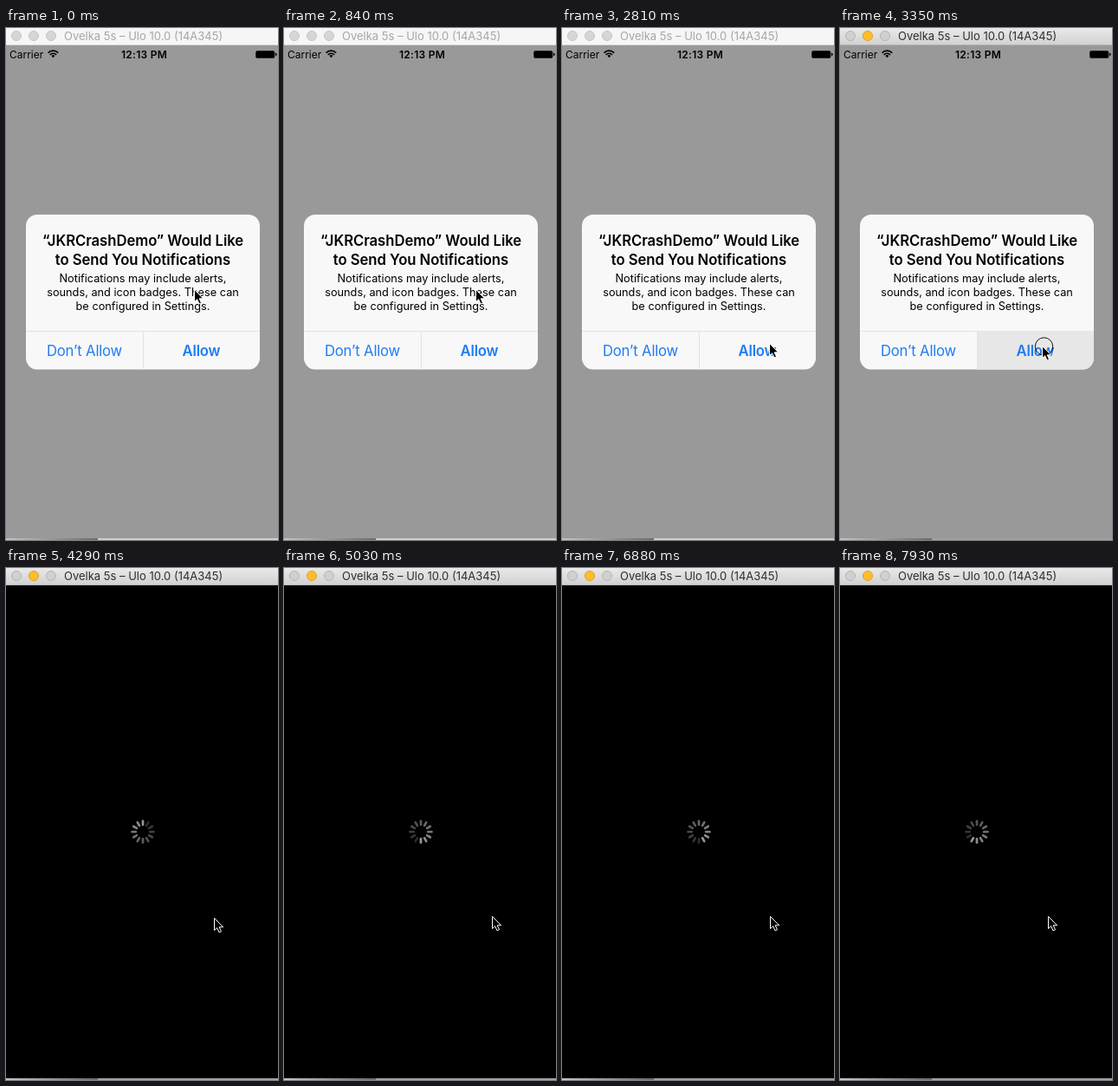
These frames come from a looping animation (314 px wide and 590 px high, 8000 ms). An HTML page:

```html
<!DOCTYPE html>
<html lang="en">
<head>
<meta charset="utf-8">
<title>Notification prompt</title>
<style>
  html, body { margin: 0; width: 100%; height: 100%; overflow: hidden; background: #000; }
  svg { display: block; width: 314px; height: 590px; }
  text { font-family: Inter, "Open Sans", sans-serif; white-space: pre; }
  .mid { text-anchor: middle; }
  .bar { font-size: 13px; }
  .status { font-size: 12px; }
  .clock { letter-spacing: .25px; }
  .head { font-size: 16.7px; font-weight: 600; letter-spacing: -.06px; }
  .body { font-size: 12.75px; }
  .btn { font-size: 16.7px; letter-spacing: -.2px; fill: #1e7cf5; }
  .bold { font-weight: 600; }
</style>
</head>
<body>
<svg viewBox="0 0 314 590">
  <defs>
    <linearGradient id="chrome" x1="0" y1="0" x2="0" y2="1">
      <stop offset="0" stop-color="#e9e9e9"/>
      <stop offset="1" stop-color="#d1d1d1"/>
    </linearGradient>
    <linearGradient id="shade">
      <stop offset="0" stop-color="#c4c4c4"/>
      <stop offset="1" stop-color="#6a6a6a"/>
    </linearGradient>
    <clipPath id="card"><rect x="23" y="215" width="270" height="178.5" rx="13.2"/></clipPath>
  </defs>

  <g id="bar">
    <rect id="barFill" width="314" height="20"/>
    <rect id="barLine" y="19" width="314" height="1"/>
    <g id="lights"></g>
    <text id="barText" class="bar" x="67" y="14">Ovelka 5s – Ulo 10.0 (14A345)</text>
  </g>

  <g id="prompt">
    <rect y="20" width="314" height="568" fill="#999"/>
    <text class="status" x="4" y="34.5">Carrier</text>
    <g fill="none" stroke="#000" stroke-width="1.7">
      <path d="M48.6 28.6a8.2 8.2 0 0 1 11.6 0M50.7 30.8a5.2 5.2 0 0 1 7.4 0"/>
      <path d="M54.4 34.2l-2-2.2a2.9 2.9 0 0 1 4 0z" fill="#000" stroke="none"/>
    </g>
    <text class="status bold clock mid" x="159.5" y="34.5">12:13 PM</text>
    <rect x="288.5" y="26.5" width="21.5" height="8" rx="1.6" stroke="#000" stroke-opacity=".5"/>
    <path d="M311 28.6q1.7 .6 1.7 1.9t-1.7 1.9z"/>

    <g clip-path="url(#card)">
      <rect x="23" y="215" width="270" height="179" fill="#f8f8f8"/>
      <path d="M23 349.5H293M158.5 349V394" stroke="#e3e3e3"/>
      <rect id="pressed" x="158.5" y="349" width="135" height="45" fill="#e7e7e7"/>
    </g>
    <text class="head mid" x="158" y="251">“JKRCrashDemo” Would Like</text>
    <text class="head mid" x="158" y="273">to Send You Notifications</text>
    <text class="body mid" x="158" y="293">Notifications may include alerts,</text>
    <text class="body mid" x="158" y="309">sounds, and icon badges. These can</text>
    <text class="body mid" x="158" y="325">be configured in Settings.</text>
    <text class="btn mid" x="90.5" y="378">Don’t Allow</text>
    <text class="btn bold mid" x="225.5" y="378">Allow</text>
  </g>

  <g id="loading">
    <rect y="20" width="314" height="568"/>
    <g id="spinner" transform="translate(158 304)" stroke-width="2.7" stroke-linecap="round"></g>
  </g>

  <g id="edge">
    <rect id="edgeRight" y="588" width="314" height="2"/>
    <rect y="588" width="106" height="2" fill="url(#shade)"/>
  </g>

  <circle id="touch" cx="235.5" cy="367" r="10.2" fill="none" stroke="#000" stroke-width=".9"/>
  <path id="cursor" d="M.5 .5V14.6L3.7 11.7 6 16.9 8.5 15.8 6.2 10.8H10.6Z"
        stroke="#fff" stroke-width="1" stroke-linejoin="round"/>
</svg>
<script>
const LOOP = 8000, ACTIVATE = 3250, PRESS = 3350, LOAD = 4290, SPIN = 4560;
const TICK = 88.5, SPOKES = 12;
const $ = id => document.getElementById(id);

// Pointer positions: time, x, y
const path = [
  [0, 217, 301], [120, 216.4, 301], [300, 218, 301], [480, 219, 301],
  [570, 220, 301], [840, 221, 301],
  [2280, 230.3, 301], [2370, 246, 307], [2460, 257, 319], [2550, 262, 333],
  [2630, 258, 346], [2720, 249, 356], [2810, 239, 363], [2890, 233, 366],
  [4290, 240, 403], [4560, 240, 402], [4650, 240, 401]
];

function add(parent, tag, attrs) {
  const el = document.createElementNS("http://www.w3.org/2000/svg", tag);
  for (const k in attrs) el.setAttribute(k, attrs[k]);
  return parent.appendChild(el);
}

const lights = [12, 32, 52].map(cx => add($("lights"), "circle", { cx, cy: 9, r: 5.5 }));
const spokes = Array.from({ length: SPOKES }, (_, i) =>
  add($("spinner"), "path", { d: "M0-8.2V-12.5", transform: `rotate(${i * 360 / SPOKES})` }));

const show = (id, on) => $(id).setAttribute("visibility", on ? "visible" : "hidden");
const fill = (id, color) => $(id).setAttribute("fill", color);

function drawWindow(active) {
  fill("barFill", active ? "url(#chrome)" : "#f6f6f6");
  fill("barLine", active ? "#b4b4b4" : "#d8d8d8");
  fill("barText", active ? "#2e2e2e" : "#a6a6a6");
  fill("edgeRight", active ? "#a0a0a0" : "#cfcfcf");
  lights.forEach((dot, i) => {
    const yellow = active && i === 1;
    dot.setAttribute("fill", yellow ? "#fdbd2e" : active ? "#d0d0d0" : "#d6d6d6");
    dot.setAttribute("stroke", yellow ? "#dfa023" : active ? "#b5b5b5" : "#c6c6c6");
  });
}

function drawSpinner(t) {
  const tick = Math.floor((t - SPIN) / TICK);
  const head = tick < 0 ? 0 : 1 + Math.floor(tick * 1.1 + .25);
  spokes.forEach((spoke, i) => {
    const age = (((head - i) % SPOKES) + SPOKES) % SPOKES;
    const v = Math.round(150 - age * 9.6);
    spoke.setAttribute("stroke", `rgb(${v},${v},${v})`);
  });
}

function draw(t) {
  const [, x, y] = path.filter(p => p[0] <= t).pop();
  $("cursor").setAttribute("transform", `translate(${x} ${y})`);
  drawWindow(t >= ACTIVATE);
  show("prompt", t < LOAD);
  show("loading", t >= LOAD);
  show("pressed", t >= PRESS && t < LOAD);
  show("touch", t >= ACTIVATE && t < LOAD);
  drawSpinner(t);
}

const start = performance.now();
function frame() {
  draw((performance.now() - start) % LOOP);
  requestAnimationFrame(frame);
}
frame();
</script>
</body>
</html>
```
